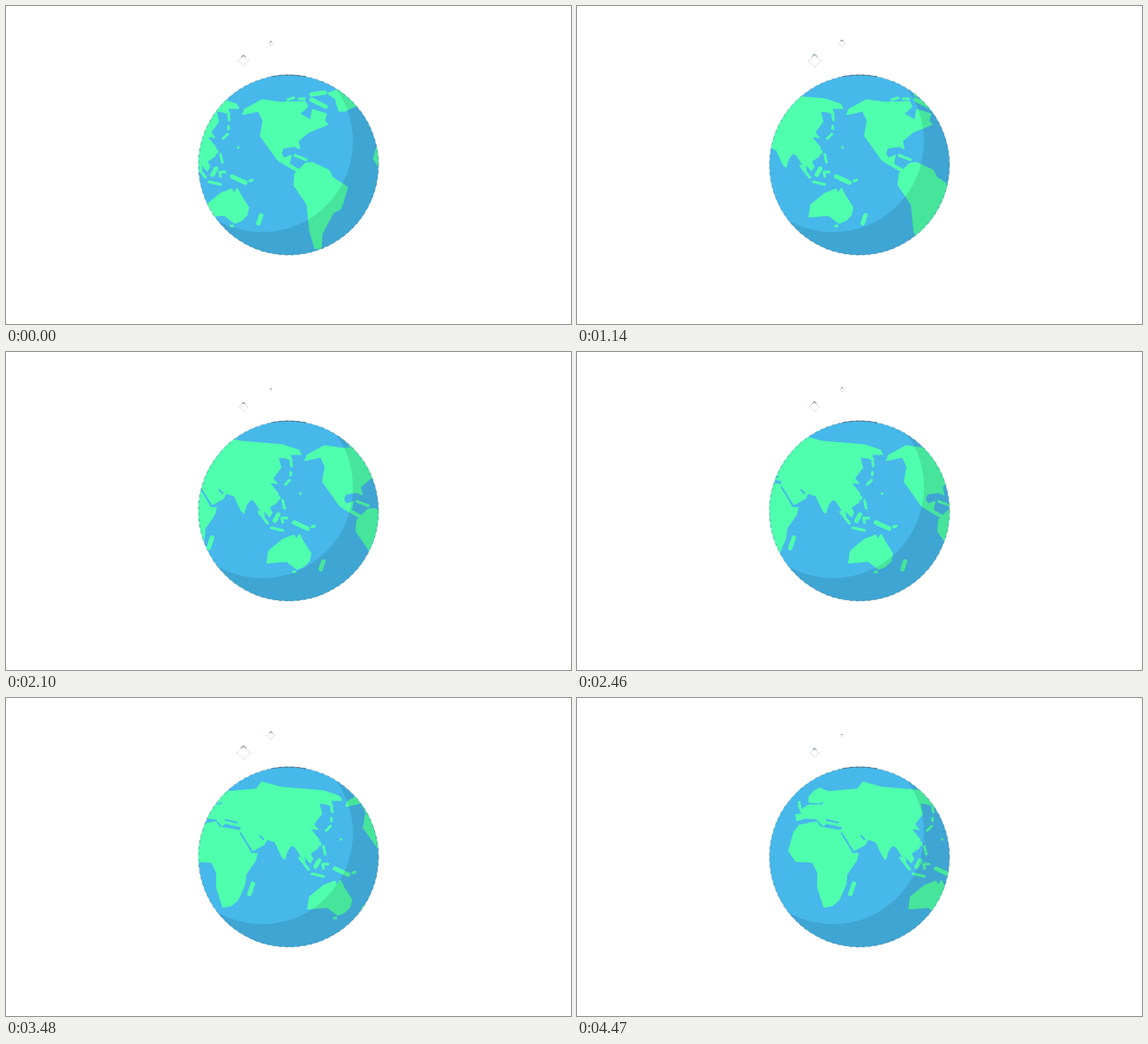
Write an HTML page that moves like this. It is 640x360 px and loops after 4500 ms.

```html
<!DOCTYPE html>
<html lang="en">
<head>
<meta charset="utf-8">
<title>Turning globe</title>
<style>
  html, body { margin: 0; width: 100%; height: 100%; overflow: hidden; background: #fff; }
  svg { display: block; width: 100vw; height: 100vh; }
  .land path { fill: #4fffad; stroke: #4fffad; stroke-width: 1; stroke-linejoin: round; }
  .land .isle { fill: none; stroke-width: 3; stroke-linecap: round; }
  .land .wide { stroke-width: 5; }
  .water { fill: #46b8ea; }
  .inlet { fill: none; stroke: #46b8ea; stroke-width: 1.8; stroke-linecap: round; }
  .rim { fill: none; stroke: #234; stroke-width: .7; }
  .star { fill: none; stroke: #aaa; stroke-width: .6; stroke-dasharray: 1.5 1.2; }
  .cap { fill: none; stroke: #47635f; stroke-width: .8; }
</style>
</head>
<body>
<svg viewBox="0 0 640 360">
  <defs>
    <clipPath id="disc"><circle cx="320" cy="180" r="102"/></clipPath>
    <g id="map">
      <g class="land">
        <!-- Africa -->
        <path d="M95 152L101 144 121 140 125 146 148 150 161 176 168 176 166 184 155 200 154 211 146 229 139 235 129 237 122 215 122 198 116 186 97 185 89 173Z"/>
        <!-- Eurasia -->
        <path d="M98 139L97 132 104 131 102 127 112 121 127 121 130 116 124 119 112 118 112 112 117 106 124 102 134 106 167 103 173 95 195 101 243 105 261 111 264 116 251 116 254 123 246 120 238 119 241 131 232 143 237 149 228 148 238 160 237 170 228 176 231 182 228 187 221 179 222 186 211 169 207 167 202 173 199 183 196 180 188 163 179 160 176 166 163 173 148 151 150 146 132 142 128 145 121 137 108 136Z"/>
        <!-- Australia -->
        <path d="M225 239L227 225 243 212 256 207 258 212 262 206 266 214 275 228 273 237 267 243 259 246 247 237Z"/>
        <!-- North America -->
        <path d="M268 123L270 117 290 106 311 109 339 108 342 114 333 122 345 129 347 117 363 122 361 130 365 134 343 143 331 153 333 162 327 159 314 161 312 167 315 172 323 169 321 179 332 185 330 188 308 175 288 147 291 130 286 119Z"/>
        <!-- South America -->
        <path d="M327 190L339 178 347 177 366 186 370 194 387 205 382 222 379 230 371 234 358 258 357 274 350 275 344 255 341 225 326 203Z"/>
        <!-- Greenland -->
        <path d="M364 99L380 93 399 112 384 119 377 119 373 105Z"/>
        <!-- Smaller islands -->
        <path class="isle" d="M101 118L102 125M252 136V139M251 145L246 150M252 124L253 129M239 164V166M243 168L245 177M216 181L226 194M230 199L243 202M248 188L242 188 243 193M276 198L279 197M255 249H257M263 160h.1M319 106L326 104M332 105H338M327 169L340 174"/>
        <path class="isle wide" d="M163 210L159 222M238 184L234 191M256 193L271 200M289 237L286 246M346 106L362 114M346 100L361 98"/>
      </g>
      <path class="inlet" d="M132 138L145 141M149 153L161 172M171 156L175 160"/>
    </g>
  </defs>
  <g clip-path="url(#disc)">
    <path class="water" d="M218 78h204v204H218Z"/>
    <g id="world"><use href="#map"/><use href="#map" x="327"/></g>
    <!-- Shade: everything outside the lit circle -->
    <path fill-opacity=".1" fill-rule="evenodd" d="M180 40H430V290H180ZM187 153a103 103 0 0 0 206 0a103 103 0 0 0 -206 0Z"/>
  </g>
  <circle class="rim" cx="320" cy="180" r="102" stroke-dasharray="3 4" opacity=".5"/>
  <path class="rim" d="M300 80A102 102 0 0 1 340 80" opacity=".7"/>
  <path class="star"/><path class="cap"/>
  <path class="star"/><path class="cap"/>
</svg>
<script>
  const LOOP = 4500, STEP = 36, SHIFT = 1.215;
  const world = document.getElementById("world");
  const stars = document.querySelectorAll(".star");
  const caps = document.querySelectorAll(".cap");

  function drawStar(i, x, y, r) {
    const k = r * .38, c = r * .4;
    stars[i].setAttribute("d", `M${x} ${y - r}Q${x + k} ${y - k} ${x + r} ${y}Q${x + k} ${y + k} ${x} ${y + r}Q${x - k} ${y + k} ${x - r} ${y}Q${x - k} ${y - k} ${x} ${y - r}`);
    caps[i].setAttribute("d", `M${x - c} ${y - r + c}L${x} ${y - r}L${x + c} ${y - r + c}`);
  }

  function draw() {
    const n = Math.floor(performance.now() % LOOP / STEP);
    const pulse = Math.cos((n - 20) / 72 * 2 * Math.PI);
    world.setAttribute("transform", `translate(${n * SHIFT})`);
    drawStar(0, 269, 62, 6.7 + 1.5 * pulse);
    drawStar(1, 300, 42.5, 3.1 + 1.6 * pulse);
    requestAnimationFrame(draw);
  }
  draw();
</script>
</body>
</html>
```
